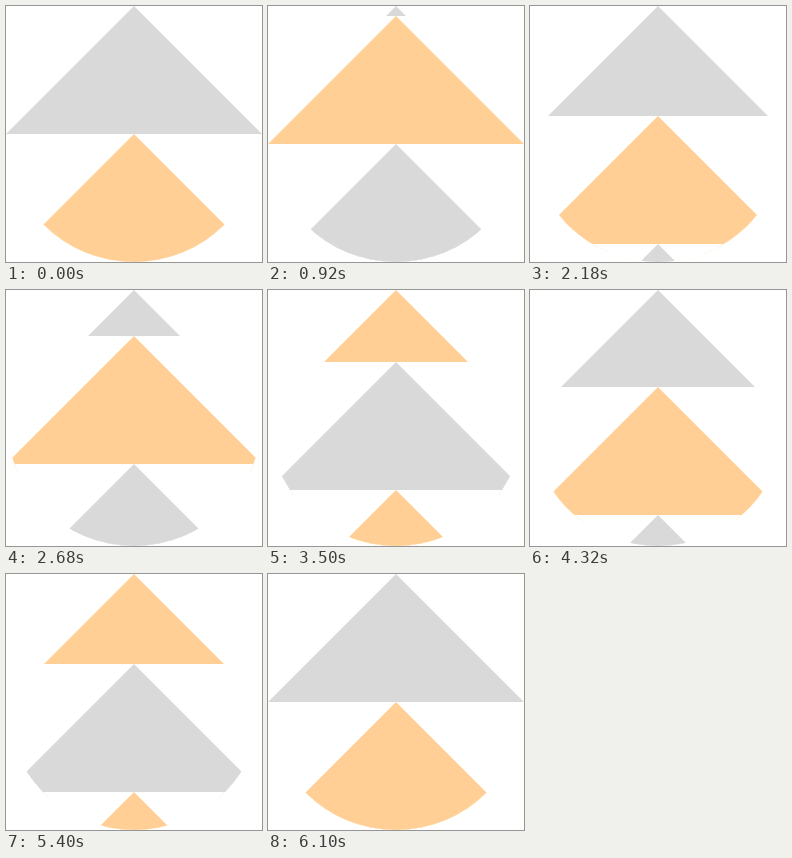
An HTML page with a canvas that plays this animation: 256 px wide and 256 px high, repeating every 6900 ms.

```html
<!DOCTYPE html>
<html>
<head>
<meta charset="utf-8">
<style>
  html, body { margin: 0; height: 100%; overflow: hidden; background: #fff; }
  canvas { display: block; width: 100vw; height: 100vh; }
</style>
</head>
<body>
<canvas width="256" height="256"></canvas>
<script>
const ctx = document.querySelector('canvas').getContext('2d');
const COLORS = ['#d9d9d9', '#ffcf96'];
const R = 128, TICK = 20, STEPS = 50, STAGES = 6, LOOP = 6900;

// Everything stays inside the circle.
ctx.arc(R, R, R, 0, 2 * Math.PI);
ctx.clip();

function triangle(top, height, color) {
  ctx.fillStyle = color;
  ctx.beginPath();
  ctx.moveTo(R, top);
  ctx.lineTo(R + height, top + height);
  ctx.lineTo(R - height, top + height);
  ctx.fill();
}

function draw(time) {
  // Each stage has STEPS + 1 ticks; the last pose holds until the loop ends.
  const ticks = STEPS + 1;
  const tick = Math.min(Math.floor(time % LOOP / TICK), STAGES * ticks - 1);
  const stage = Math.floor(tick / ticks);
  const offset = Math.round(R * (1 - tick % ticks / STEPS));
  const first = COLORS[stage % 2], second = COLORS[(stage + 1) % 2];

  ctx.fillStyle = '#fff';
  ctx.fillRect(0, 0, 2 * R, 2 * R);
  triangle(0, offset, first);
  triangle(offset, R, second);
  triangle(offset + R, R, first);
}

const start = performance.now();
function frame() {
  draw(performance.now() - start);
  requestAnimationFrame(frame);
}
frame();
</script>
</body>
</html>
```
